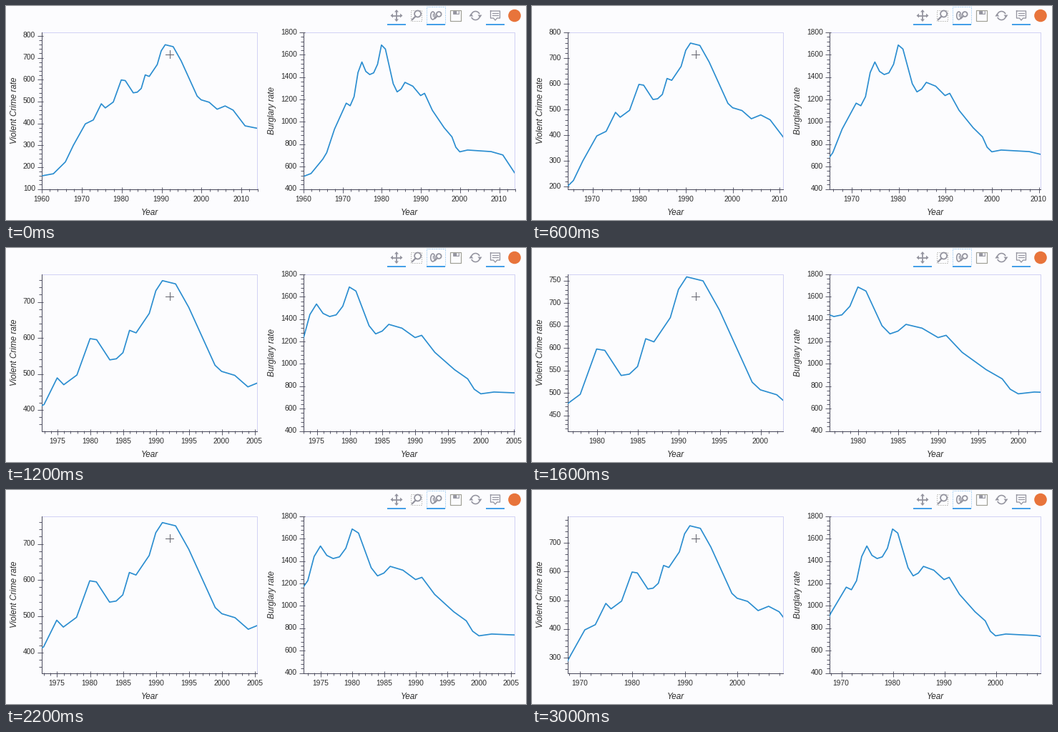
Write a matplotlib script that moves like this. It is 727 px wide and 300 px high and loops after 3200 ms.

```python
import matplotlib.pyplot as plt
import numpy as np
from matplotlib.animation import FuncAnimation
from matplotlib.patches import Circle, Ellipse, Polygon, Rectangle

W, H, DPI = 727, 300, 64
PX = 72 / DPI  # points per pixel
FRAMES, STEP_MS = 16, 200
BG, AXIS, FRAME = "#fcfcfe", "#4a4a5c", "#d2d2f4"
CURVE, ICON, ACTIVE, INK = "#2a8dd0", "#94949f", "#3296e6", "#2c2c2c"
TOP, BOTTOM = 36.5, 256

# Turning points of each series; the years between lie on straight lines
VIOLENT = [
    (1960, 158), (1963, 168), (1966, 222), (1968, 298), (1971, 396), (1973, 414),
    (1975, 488), (1976, 469), (1978, 496), (1980, 597), (1981, 594), (1983, 538),
    (1984, 541), (1985, 558), (1986, 620), (1987, 613), (1989, 667), (1990, 730),
    (1991, 758), (1993, 749), (1995, 684), (1999, 523), (2000, 506), (2002, 495),
    (2004, 463), (2006, 478), (2008, 459), (2011, 387), (2014, 376)]
BURGLARY = [
    (1960, 508), (1962, 535), (1965, 663), (1966, 721), (1968, 932), (1971, 1164),
    (1972, 1141), (1973, 1222), (1974, 1438), (1975, 1532), (1976, 1448), (1977, 1420),
    (1978, 1435), (1979, 1512), (1980, 1684), (1981, 1648), (1983, 1338), (1984, 1265),
    (1985, 1290), (1986, 1350), (1988, 1316), (1990, 1232), (1991, 1252), (1993, 1100),
    (1996, 945), (1998, 863), (1999, 770), (2000, 729), (2002, 745), (2008, 731),
    (2011, 701), (2014, 542)]

FOCUS_X, FOCUS_Y = 1992.08, 715  # data under the pointer
LEAD = 0.175  # the linked chart is slightly ahead, in steps

plt.rcParams["font.family"] = "Liberation Sans"
fig = plt.figure(figsize=(W / DPI, H / DPI), dpi=DPI, facecolor=BG)
ax = fig.add_axes([0, 0, 1, 1])
ax.set(xlim=(0, W), ylim=(H, 0))
ax.axis("off")


def line(xs, ys, color, width=1.0, **kw):
    return ax.plot(xs, ys, color=color, lw=width * PX, **kw)[0]


def text(x, y, s, size, **kw):
    return ax.text(x, y, s, fontsize=size * PX, color=INK, **kw)


def zoom_level(step):
    """Wheel zoom: rest, accelerate in, then ease back out part of the way."""
    u = np.clip((step - 1) / 7, 0, 1)
    v = np.clip((step - 8) / 5.7, 0, 1)
    return 1 + 1.05 * u ** 1.44 - 0.735 * v * v * (3 - 2 * v)


def zoomed(lo, hi, focus, k):
    return focus - (focus - lo) / k, focus + (hi - focus) / k


def tick_values(lo, hi, desired=6, minors=5):
    """Major and minor ticks, with a 1-2-5 interval closest to the desired count."""
    span = hi - lo
    mag = 10 ** np.floor(np.log10(span / desired))
    step = min((m * mag for m in (1, 2, 5, 10)), key=lambda s: abs(desired - span / s))
    small = step / minors
    eps = 1e-6
    n = np.arange(np.ceil(lo / small - eps), np.floor(hi / small + eps) + 1)
    return n[n % minors == 0] * small, n[n % minors != 0] * small


def dashes(pos, start, end):
    """Gap-separated segments across an axis line at each position."""
    along = np.repeat(np.floor(pos) + 0.5, 3)
    across = np.tile([start, end, np.nan], len(pos))
    return along, across


class Chart:
    def __init__(self, left, right, points, ylim, label, label_x):
        self.left, self.right, self.ylim = left, right, ylim
        self.years, self.rates = np.array(points, float).T
        line([left, right, right], [TOP, TOP, BOTTOM], FRAME)
        line([left, left, right], [TOP, BOTTOM + 0.5, BOTTOM + 0.5], AXIS)
        self.curve = line([], [], CURVE, 1.7, solid_joinstyle="round")
        self.curve.set_clip_path(Rectangle(
            (left, TOP), right - left, BOTTOM - TOP, transform=ax.transData))
        self.xticks, self.yticks = ([line([], [], AXIS, 0.9, solid_capstyle="butt")
                                     for _ in range(2)] for _ in range(2))
        self.xlabels = [text(0, 270.5, "", 10.3, ha="center", va="center") for _ in range(14)]
        self.ylabels = [text(left - 8.5, 0, "", 10.3, ha="right", va="center") for _ in range(14)]
        text((left + right) / 2 + 0.5, 293, "Year", 11.8, style="italic", ha="center")
        text(label_x, 146.5, label, 11.8, style="italic", ha="center", va="center", rotation=90)

    def draw(self, xlim, ylim):
        def to_x(v):
            return self.left + (v - xlim[0]) / (xlim[1] - xlim[0]) * (self.right - self.left)

        def to_y(v):
            return BOTTOM - (v - ylim[0]) / (ylim[1] - ylim[0]) * (BOTTOM - TOP)

        self.curve.set_data(to_x(self.years), to_y(self.rates))
        xvals, yvals = tick_values(*xlim), tick_values(*ylim)
        for k, (inner, outer) in enumerate([(2, 6), (0, 4)]):
            self.xticks[k].set_data(*dashes(to_x(xvals[k]), BOTTOM - inner, BOTTOM + outer))
            self.yticks[k].set_data(
                *dashes(to_y(yvals[k]), self.left + inner, self.left - outer)[::-1])
        for label in self.xlabels + self.ylabels:
            label.set_text("")
        for label, v in zip(self.xlabels, xvals[0]):
            label.set(x=to_x(v), text=f"{v:.0f}")
        for label, v in zip(self.ylabels, yvals[0]):
            label.set(y=to_y(v), text=f"{v:.0f}")


def shape(points):
    ax.add_patch(Polygon(points, fc=ICON, ec="none"))


def box(x, y, w, h, color=ICON, width=1.2, fill="none", **kw):
    ax.add_patch(Rectangle((x, y), w, h, fc=fill, ec=color, lw=width * PX, **kw))


def magnifier(x, y, r, handle):
    ax.add_patch(Circle((x, y), r, fc=BG, ec=ICON, lw=1.8 * PX))
    line([x - 0.7 * r, x - 0.7 * r - handle], [y + 0.8 * r, y + 0.8 * r + handle], ICON, 2.2)


def pan_icon(x, y):
    line([x - 6, x + 6], [y, y], ICON, 1.8)
    line([x, x], [y - 6, y + 6], ICON, 1.8)
    for dx, dy in ((1, 0), (-1, 0), (0, 1), (0, -1)):
        shape([(x + 8.5 * dx, y + 8.5 * dy),
               (x + 5 * dx + 3 * dy, y + 5 * dy + 3 * dx),
               (x + 5 * dx - 3 * dy, y + 5 * dy - 3 * dx)])


def box_zoom_icon(x, y):
    box(x - 8, y - 8, 15.5, 15.5, "#b4b4b0", 1, ls=(0, (1.5, 1.5)))
    magnifier(x + 2, y - 2.5, 4.5, 4.5)


def wheel_zoom_icon(x, y):
    box(x - 13, 0.8, 26, 24.5, "#7fbdf0", 1, ls=(0, (1, 1.5)))
    ax.add_patch(Ellipse((x - 4.5, y), 6, 11, fc="none", ec=ICON, lw=1.6 * PX))
    line([x - 4.5, x - 4.5], [y - 3, y], ICON, 1.4)
    magnifier(x + 4, y - 2, 3.4, 3)


def save_icon(x, y):
    box(x - 7.5, y - 7.5, 15, 15, "#a0a096", 1.2)
    box(x - 3.5, y - 7, 8, 4.5, ICON, 0.8, fill=ICON)
    box(x + 0.8, y - 6.2, 2, 3, BG, 0.5, fill=BG)


def reset_icon(x, y):
    for side in (1, -1):
        a = np.radians(np.linspace(15, 150, 24))
        line(x + side * 6 * np.cos(a), y + side * 6 * np.sin(a), ICON, 1.6)
        shape([(x + side * 3, y - side), (x + side * 9, y - side),
               (x + side * 6.5, y + side * 2.8)])


def hover_icon(x, y):
    line([x - 6.5, x + 6.5, x + 6.5, x + 2.5, x, x - 2.5, x - 6.5, x - 6.5],
         [y - 6.5, y - 6.5, y + 3.5, y + 3.5, y + 6.5, y + 3.5, y + 3.5, y - 6.5], ICON, 1.3)
    for dy in (-3.5, -0.5):
        line([x - 4, x + 4], [y + dy, y + dy], ICON, 1.2)


TOOLS = [(pan_icon, True), (box_zoom_icon, False), (wheel_zoom_icon, True),
         (save_icon, False), (reset_icon, False), (hover_icon, True)]
for i, (icon, active) in enumerate(TOOLS):
    tool_x = 546 + 27.6 * i
    icon(tool_x, 13.5)
    if active:
        line([tool_x - 13, tool_x + 13], [26, 26], ACTIVE, 1.8, solid_capstyle="butt")
ax.add_patch(Circle((711, 13.5), 8.8, fc="#e8743b", ec="none"))

violent = Chart(49.5, 351, VIOLENT, (100, 816), "Violent Crime rate", 12)
burglary = Chart(415.5, 711, BURGLARY, (400, 1800), "Burglary rate", 372.5)

# Crosshair pointer
line([223, 234], [67.5, 67.5], "#62626c", 1, zorder=5)
line([228.5, 228.5], [62, 73], "#62626c", 1, zorder=5)


def update(i):
    k = zoom_level(i)
    violent.draw(zoomed(1960, 2014, FOCUS_X, k), zoomed(*violent.ylim, FOCUS_Y, k))
    k = zoom_level(i + LEAD)
    burglary.draw(zoomed(1960, 2014, FOCUS_X, k), burglary.ylim)
    return []


anim = FuncAnimation(fig, update, frames=FRAMES, interval=STEP_MS,
                     repeat=True, repeat_delay=0, blit=False)
plt.show()
```
